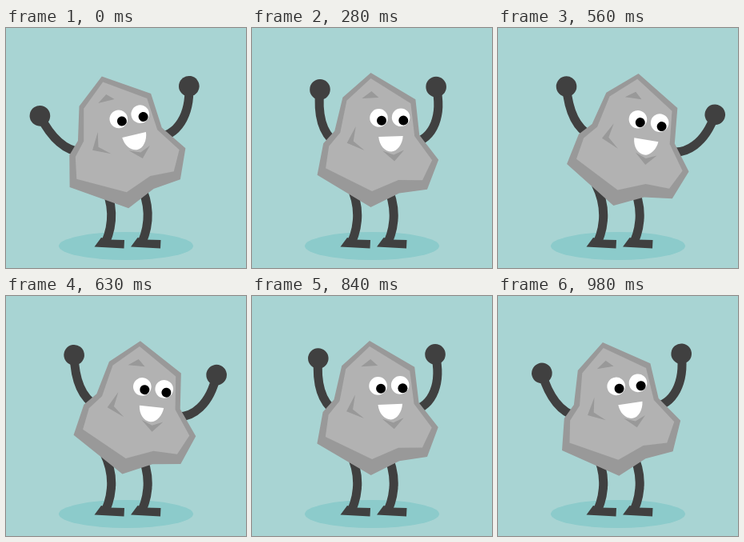
These frames come from a looping animation (300 px wide and 300 px high, 1.05 s). An HTML page:

```html
<!DOCTYPE html>
<html lang="en">
<head>
<meta charset="utf-8">
<title>Dancing rock</title>
<style>
  html, body { margin: 0; height: 100%; overflow: hidden; background: #a8d4d3; }
  svg { display: block; width: 100%; height: 100%; }
  .limb { fill: none; stroke: #404040; stroke-width: 11; }
  .dark { fill: #404040; }
  .edge { fill: #999; }
  .face { fill: #b2b2b2; }
</style>
</head>
<body>
<svg viewBox="0 0 300 300">
  <defs>
    <g id="leg">
      <path class="limb" d="M122 195C133 217 135.5 242 124.5 268"/>
      <path class="dark" d="M110.5 273.5L119 262 128 264.5 148 265 147.5 275.5Z"/>
    </g>
  </defs>
  <ellipse cx="150" cy="272.5" rx="84" ry="17.5" fill="#8ccbcb"/>
  <use href="#leg"/>
  <use href="#leg" x="45.5"/>

  <g id="body">
    <g id="left">
      <path class="limb" d="M85 77C82 104 86 130 104 144"/>
      <circle class="dark" cx="85" cy="77" r="12.8"/>
    </g>
    <g id="right">
      <path class="limb" d="M230.4 73.6C238 108 228 138 200 144"/>
      <circle class="dark" cx="230.4" cy="73.6" r="12.8"/>
    </g>

    <path class="edge" d="M148 56L204 89 209 133.5 233 164.5 219 201.5 184 206.5 148.5 224 81.5 184 89 144.5 103 129 113 87Z"/>
    <path class="face" d="M148 63L198 94 203 135 225 165 213 190 183 190 150 204 92 175.5 96 148 110 131 118 91Z"/>
    <path class="edge" d="M137 88L149 79 158 87ZM129.5 123L118.5 144 140.5 153 126.5 141.5ZM163 153.5L178 166.5 190 152.5 177 158.5Z"/>

    <g fill="#fff">
      <circle cx="158.2" cy="112.4" r="11.3"/>
      <circle cx="185.8" cy="111.6" r="11.3"/>
      <path d="M158 136L188.5 135C188 145.5 181 154.5 174 154.5 166 154.5 159 147 158 136Z"/>
    </g>
    <circle cx="161.7" cy="115.7" r="6"/>
    <circle cx="189" cy="115.5" r="6"/>
  </g>
</svg>
<script>
  const LOOP = 1050, STEP = 70;
  // [time in ms, lean in degrees]
  const keys = [[0, -11.3], [280, 0.2], [420, 5.2], [560, 10.9],
                [700, 4.8], [840, -0.4], [980, -6.8], [1050, -11.3]];

  const turn = (id, deg, x, y) =>
    document.getElementById(id).setAttribute('transform', `rotate(${deg} ${x} ${y})`);

  function leanAt(t) {
    const i = keys.findIndex(k => k[0] > t);
    const [t0, a0] = keys[i - 1], [t1, a1] = keys[i];
    return a0 + (a1 - a0) * (t - t0) / (t1 - t0);
  }

  function draw(now) {
    const t = Math.floor(now % LOOP / STEP) * STEP;
    const lean = leanAt(t);
    // The arm on the side of the lean swings wide, the other one stays upright.
    const swing = 4.03 * Math.abs(lean) - 0.096 * lean * lean;
    turn('body', lean, 157, 201);
    turn('left', (lean < 0 ? -swing : -lean) - lean, 105, 141);
    turn('right', (lean > 0 ? swing : -lean) - 1.2 - lean, 200, 140);
  }

  const start = performance.now();
  function loop() {
    draw(performance.now() - start);
    requestAnimationFrame(loop);
  }
  loop();
</script>
</body>
</html>
```
